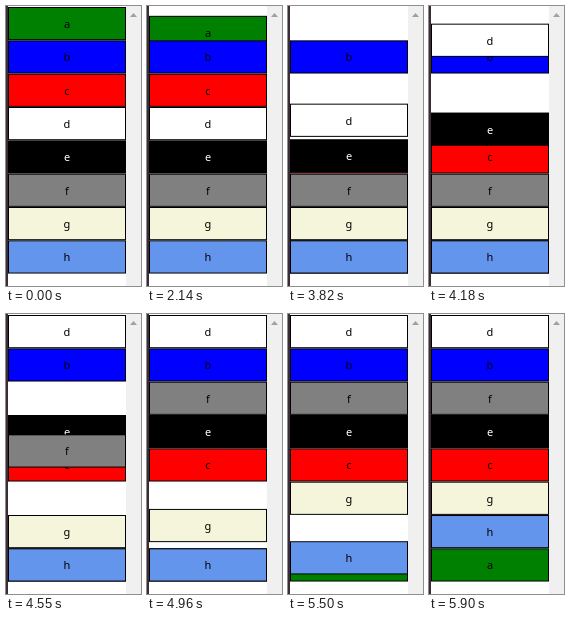
Animation, 135 px wide and 280 px high, one loop 6630 ms. Source, as an HTML page with a canvas:

```html
<!DOCTYPE html>
<html lang="en">
<head>
<meta charset="utf-8">
<title>Reordering list</title>
<style>
  html, body { margin: 0; width: 100%; height: 100%; overflow: hidden; background: #fff; }
  canvas { display: block; width: 135px; height: 280px; }
</style>
</head>
<body>
<canvas id="stage"></canvas>
<script>
const WIDTH = 135, HEIGHT = 280, LOOP = 6630;
const LEFT = 2, ROW_WIDTH = 118, ROW_HEIGHT = 33.2, TOP = 1, PITCH = 100 / 3;
const MOVE = 450;

// Rows in paint order; "to" is the final slot, "start" when the row leaves.
const rows = [
  { label: 'a', color: 'green', to: 7, start: 2124 },
  { label: 'b', color: 'blue', to: 1, start: 0 },
  { label: 'c', color: 'red', to: 4, start: 2664 },
  { label: 'd', color: 'white', to: 0, start: 3806 },
  { label: 'e', color: 'black', to: 3, start: 3806 },
  { label: 'f', color: 'gray', to: 2, start: 4338 },
  { label: 'g', color: 'beige', to: 5, start: 4879 },
  { label: 'h', color: 'cornflowerblue', to: 6, start: 5405 }
];

const canvas = document.getElementById('stage');
// An opaque canvas allows subpixel text smoothing.
const ctx = canvas.getContext('2d', { alpha: false });
const scale = window.devicePixelRatio || 1;
canvas.width = Math.round(WIDTH * scale);
canvas.height = Math.round(HEIGHT * scale);

const clamp = v => Math.min(1, Math.max(0, v));

function box(x, y, w, h, color) {
  ctx.fillStyle = color;
  ctx.fillRect(x, y, w, h);
}

function drawFrame() {
  box(0, 0, WIDTH, HEIGHT, '#fff');
  box(0, 0, LEFT, HEIGHT, '#3b2d38');
  box(120, 0, 15, HEIGHT, '#f0f0f0');
  ctx.fillStyle = '#a0a0a0';
  ctx.beginPath();
  ctx.moveTo(124, 11);
  ctx.lineTo(127.5, 7);
  ctx.lineTo(131, 11);
  ctx.fill();
}

function drawRow(row, slot, time) {
  const progress = clamp((time - row.start) / MOVE);
  const y = TOP + PITCH * (slot + (row.to - slot) * progress);
  // Fractional edges leave soft seams between rows.
  box(LEFT, y, ROW_WIDTH, ROW_HEIGHT, '#000');
  box(LEFT + 1, y + 1, ROW_WIDTH - 2, ROW_HEIGHT - 2, row.color);
  ctx.fillStyle = row.color === 'black' ? '#fff' : '#000';
  ctx.fillText(row.label, LEFT + ROW_WIDTH / 2, Math.round(y) + 21);
}

function render(time) {
  ctx.setTransform(scale, 0, 0, scale, 0, 0);
  ctx.font = '11px "Noto Sans", sans-serif';
  ctx.textAlign = 'center';
  drawFrame();
  rows.forEach((row, slot) => drawRow(row, slot, time));
}

const began = performance.now();
function tick() {
  render((performance.now() - began) % LOOP);
  requestAnimationFrame(tick);
}
tick();
</script>
</body>
</html>
```
